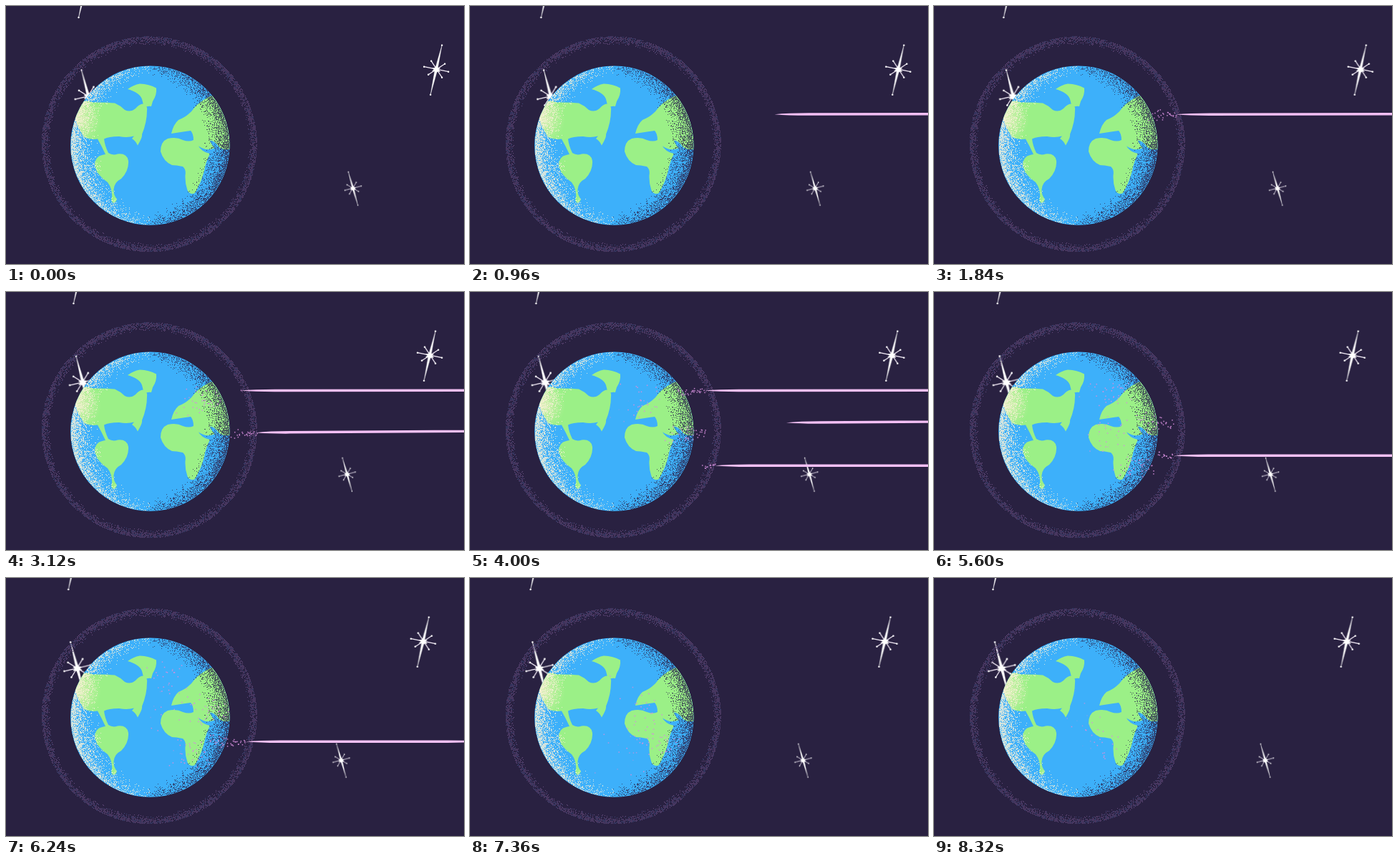
Write an HTML page with a canvas that moves like this. It is 640 px wide and 360 px high and loops after 8.4 s.

```html
<!DOCTYPE html>
<html lang="en">
<head>
<meta charset="utf-8">
<title>Earth and beams</title>
<style>
  html, body { margin: 0; width: 100%; height: 100%; overflow: hidden; background: #292141; }
  svg, canvas { position: absolute; left: 0; top: 0; width: 640px; height: 360px; }
  .drift { animation: drift 8.4s steps(105, end) infinite; }
  @keyframes drift { to { transform: translateX(var(--dx)); } }
</style>
</head>
<body>
<svg viewBox="0 0 640 360">
  <defs>
    <g id="star" stroke-linecap="round">
      <path d="M8-34 1.7.4-8 35-1.7-.4Z" fill="#fff" stroke="#fff" stroke-width=".4"/>
      <path d="M-17-4 17 3M-7-12 8 11M12-8-11 7" stroke="#f6eefa" stroke-width="1.2"/>
      <path d="M8-34h0M-8 35h0M-17-4h0M17 3h0M-7-12h0M8 11h0M12-8h0M-11 7h0" stroke="#fff" stroke-width="2.4"/>
      <path d="M0-5 1.7-2.7 6-2 3.4 0 6 3 1.8 2.8 0 5-1.8 2.8-6 2-3.4 0-6-2-1.8-2.8Z" fill="#fff"/>
    </g>
    <radialGradient id="land" gradientUnits="userSpaceOnUse" cx="95" cy="157" r="38">
      <stop offset=".1" stop-color="#d9efb4"/>
      <stop offset="1" stop-color="#9bf087"/>
    </radialGradient>
    <clipPath id="globe"><circle cx="201.3" cy="194.6" r="111.2"/></clipPath>
  </defs>

  <g class="drift" style="--dx:-24.7px"><use href="#star" transform="translate(601.2 88.7)"/></g>
  <g class="drift" style="--dx:-22.2px"><use href="#star" transform="translate(485 254.5) rotate(-3) scale(-.68 .68)"/></g>
  <g class="drift" style="--dx:-20.7px"><use href="#star" transform="translate(115.2 126.3) rotate(-1.5) scale(-1.09 1.09)"/></g>
  <g class="drift" style="--dx:-19.3px"><use href="#star" transform="translate(109.5 -19)"/></g>

  <circle cx="201.3" cy="194.6" r="111.2" fill="#3db0fa"/>
  <g clip-path="url(#globe)" fill="url(#land)">
    <path d="M170 116Q178 110 187 108.500Q200 109 210 114.500Q211 124 205 133L203 140Q198 139 194 141.500Q191 136 190 130Q187 121 170 116Z"/>
    <path d="M90 139Q106 129 122 134.500Q140 134 152 135.500Q160 139 166 145Q174 149 181 143Q187 136 192 136.500Q198 139 197 146Q197 162 190 179Q191 183 184 194.500Q181 188 176 185L179 181.500Q170 184 158 182Q143 182 137 185.500Q138 195 143 205Q149 209 156 206.500Q169 205 171 216Q172 230 161 241Q151 246 150.500 256Q150 263 154 268Q156 273 150 275Q146 273 148 267Q149 255 142 246Q132 239 127 231Q120 217 130 209.500Q136 207 139 207Q134 196 128 185.500Q118 187 109 183Q102 172 96 156Z"/>
    <path d="M231 178Q234 165 241 159Q255 154 264 141Q274 130 290 124L315 140V199Q302 202 297 196Q292 188 285 187.500Q287 194 292 198Q283 202 276 199Q268 196 267.500 193Q273 204 285 206Q279 218 277 230Q272 248 264 261Q258 264 254 258Q250 248 250.500 236Q252 228 247 224Q238 222 232 222Q220 217 216 203Q216 189 226 185Q238 182 247 187Q256 190 262 187Q262 178 258 174Q246 176 231 178Z"/>
  </g>
</svg>
<canvas id="grain" width="640" height="360"></canvas>
<canvas id="fx" width="640" height="360"></canvas>
<script>
const LOOP = 8400, STEP = 80, SPEED = 1.65, HOLD = 1375, TAPER = 48;

// start time, y at the left end, y at the right edge, x of the left end
const beams = [
  [830, 151.3, 150.8, 338],
  [2200, 196.2, 194.2, 349],
  [2900, 137.5, 137.3, 328],
  [3400, 242.3, 242.3, 342],
  [3880, 182.8, 181, 350],
  [4880, 228.3, 228.2, 335]
].map(([start, y, yRight, end]) => ({ start, y, yRight, end }));

function seeded(seed) {
  return () => {
    seed = (seed * 1664525 + 1013904223) >>> 0;
    return seed / 4294967296;
  };
}

const context = id => document.getElementById(id).getContext('2d');

const density = (d, from, span, power, top) =>
  d < from ? 0 : top * Math.min(1, (d - from) / span) ** power;

// Calls paint for every pixel whose centre lies within r of (cx, cy).
function eachPixel(cx, cy, r, paint) {
  for (let y = Math.floor(cy - r); y < cy + r; y++) {
    for (let x = Math.floor(cx - r); x < cx + r; x++) {
      const dx = x + .5 - cx, dy = y + .5 - cy;
      if (Math.hypot(dx, dy) <= r) paint(x, y, dx, dy);
    }
  }
}

function paintGrain(g) {
  const rand = seeded(7);
  const dot = (x, y, color) => {
    g.fillStyle = color;
    g.fillRect(x, y, 1, 1);
  };
  eachPixel(201.3, 194.6, 110.6, (x, y, dx, dy) => {
    const pick = rand();
    const light = density(Math.hypot(dx - 28, dy + 2), 98, 40, 1.9, .9);
    const dark = density(Math.hypot(dx + 23, dy + 1), 96, 36, 1.7, .85);
    if (dx < 0 && pick < light) dot(x, y, 'rgba(248, 241, 216, .8)');
    else if (dx > -15 && pick < dark) dot(x, y, 'rgba(43, 38, 78, .72)');
  });
  // Fine speckled halo, on every other pixel
  eachPixel(200.3, 192.8, 150.5, (x, y, dx, dy) => {
    const cover = density(Math.hypot(dx, dy), 138, 8, 1, .75);
    if ((x + y) % 2 && rand() < cover) dot(x, y, rand() < .7 ? '#654b7d' : '#3f4778');
  });
}

const rand = seeded(42);
const sparks = beams.flatMap(b => Array.from({ length: 38 }, (_, i) => ({
  born: b.start + (640 - b.end) / SPEED + (i + rand()) / 38 * 1150,
  x: b.end - 2 + rand() * 4,
  y: b.y + (rand() - .5) * 6,
  vx: -(36 + rand() * 12),
  vy: (rand() - .5) * 20,
  life: 2400 + rand() * 1400
})));

function drawSpark(g, s, t) {
  const age = t - s.born;
  if (age < 0 || age > s.life) return;
  const sec = age / 1000;
  g.globalAlpha = Math.min(.9, (s.life - age) / 500);
  g.fillRect(s.x + s.vx * sec, s.y + s.vy * sec, 1.5, 1.5);
}

function drawBeam(g, b, t) {
  const age = t - b.start;
  if (age <= 0) return;
  const head = Math.max(b.end, 640 - age * SPEED);
  const tail = 640 + (HOLD - age) * SPEED;
  if (tail <= head) return;
  const yAt = x => b.y + (b.yRight - b.y) * (x - b.end) / (640 - b.end);
  const cap = Math.min(TAPER, (tail - head) / 2), half = 1.75;
  const a = head + cap, z = tail - cap, a2 = head + cap * .4, z2 = tail - cap * .4;
  g.beginPath();
  g.moveTo(head, yAt(head));
  g.quadraticCurveTo(a2, yAt(a2) - half, a, yAt(a) - half);
  g.lineTo(z, yAt(z) - half);
  g.quadraticCurveTo(z2, yAt(z2) - half, tail, yAt(tail));
  g.quadraticCurveTo(z2, yAt(z2) + half, z, yAt(z) + half);
  g.lineTo(a, yAt(a) + half);
  g.quadraticCurveTo(a2, yAt(a2) + half, head, yAt(head));
  g.fill();
}

paintGrain(context('grain'));
const fx = context('fx');
let origin;

function frame(now) {
  origin ??= now;
  const t = Math.floor((now - origin) % LOOP / STEP) * STEP;
  fx.clearRect(0, 0, 640, 360);
  fx.fillStyle = '#d590dd';
  for (const s of sparks) drawSpark(fx, s, t);
  fx.globalAlpha = 1;
  fx.fillStyle = '#f4c0f5';
  for (const b of beams) drawBeam(fx, b, t);
  requestAnimationFrame(frame);
}
requestAnimationFrame(frame);
</script>
</body>
</html>
```
